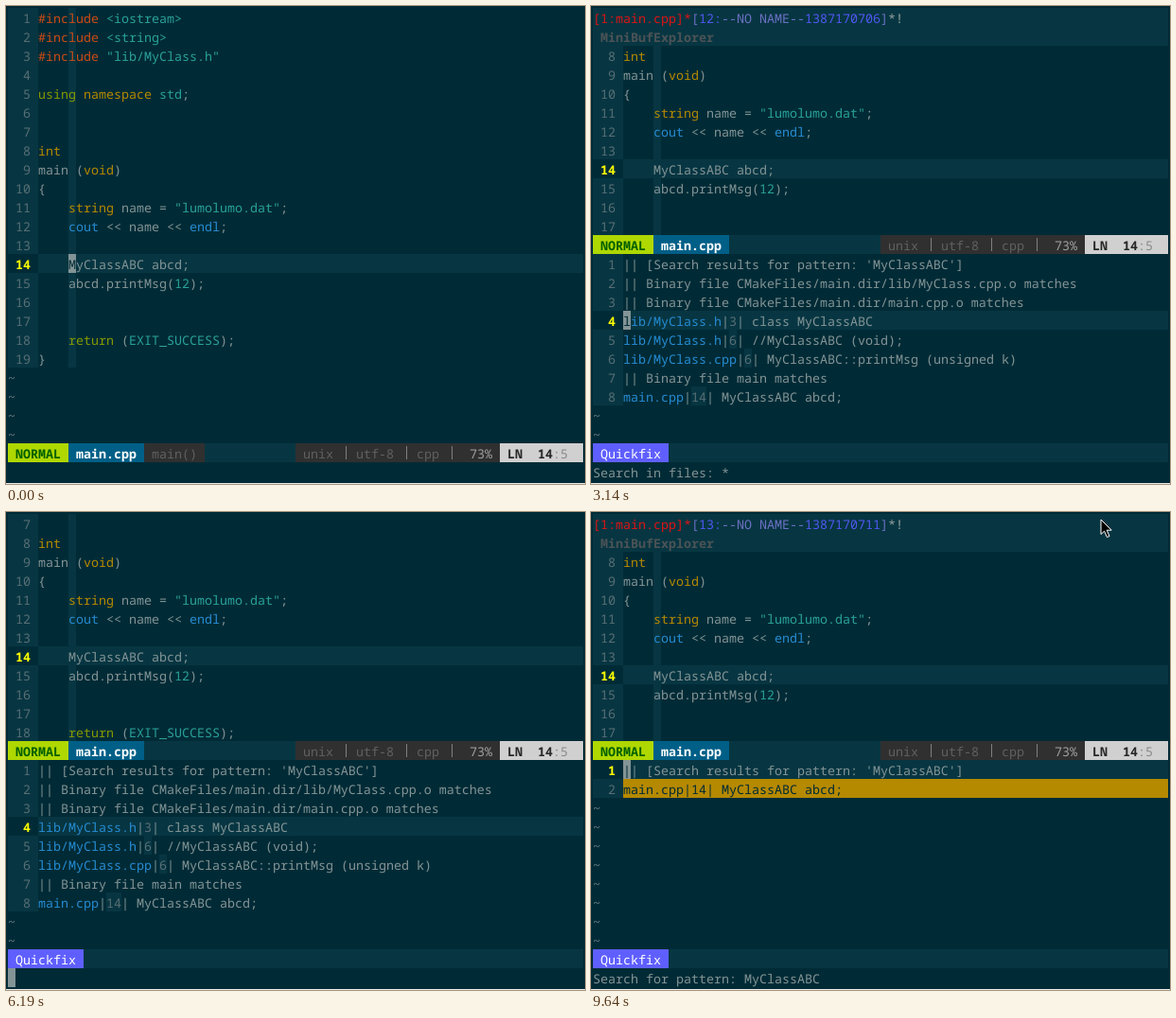
These frames come from a looping animation (612x505 px, 9690 ms). An HTML page:

```html
<!DOCTYPE html>
<html lang="en">
<head>
<meta charset="utf-8">
<title>Searching files from the editor</title>
<style>
  html, body { margin: 0; width: 100%; height: 100%; overflow: hidden; background: #002b36; }
  #stage { position: relative; width: 612px; height: 505px; overflow: hidden; }
  #stage::after { content: ""; position: absolute; left: 0; top: 504px; width: 612px; height: 1px; background: #eee; }
  #term { position: absolute; left: 2px; top: 2px; width: 608px; height: 500px; color: #839496;
    font: 13.3333px/22px "Noto Sans Mono", monospace; text-rendering: geometricPrecision; }
  #term i { position: absolute; height: 20px; font-style: normal; white-space: pre; }
  #mouse { position: absolute; left: 538px; top: 7px; }
  .o { color: #cb4b16 } .c { color: #2aa198 } .g { color: #859900 } .y { color: #b58900 }
  .b { color: #268bd2 } .n { color: #586e75 } .t { color: #657b83 }
  .r { color: #dc1414 } .v { color: #6c71c4 } .d { color: #5058f0 } .w { color: #93a1a1 }
  .cur { color: #ff0; font-weight: bold }
  .band { background: #073642 }
  .k { background: #073642; color: #586e75 }
  .hit { background: #b58900; color: #002b36 }
  .caret { background: #839496; color: #002b36 }
  .mode { background: #afd700; color: #005f00; font-weight: bold }
  .file { background: #005f87; color: #fff; font-weight: bold }
  .info { background: #303030; color: #606060 }
  .pct { background: #303030; color: #9e9e9e }
  .pos { background: #d0d0d0; color: #262626; font-weight: bold }
  .col { color: #8a8a8a }
  .sep { width: 1px; height: 14px !important; margin: 3px 0 0 5px; background: #808080 }
  .mini { background: #073642; color: #4c5356; font-weight: bold }
  .qf { background: #5f5fff; color: #fff }
</style>
</head>
<body>
<div id="stage">
  <div id="term"></div>
  <svg id="mouse" width="14" height="21" viewBox="-1 -1 14 21">
    <path d="M0 0V15.5L3.6 12.2 6.4 18.6 9 17.5 6.2 11.2H11.2Z" fill="#000" stroke="#fff"/>
  </svg>
</div>
<script>
const LOOP = 9690, COLS = 76;

// Backticks wrap a coloured run; its first letter names the class.
const code = [
  '`o#include` `c<iostream>`',
  '`o#include` `c<string>`',
  '`o#include` `c"lib/MyClass.h"`',
  '',
  '`gusing` `ynamespace` `cstd`;',
  '',
  '',
  '`yint`',
  'main (`yvoid`)',
  '{',
  '    `ystring` name = `c"lumolumo.dat"`;',
  '    `bcout` << name << `bendl`;',
  '',
  '    MyClassABC abcd;',
  '    abcd.printMsg(`c12`);',
  '',
  '',
  '    `greturn` (`cEXIT_SUCCESS`);',
  '}'
];
const title = "|| [Search results for pattern: 'MyClassABC']";
const lists = {
  files: {
    hit: 4, buf: ['12', '1387170706'], prompt: 'Search in files: *',
    rows: [
      title,
      '|| Binary file CMakeFiles/main.dir/lib/MyClass.cpp.o matches',
      '|| Binary file CMakeFiles/main.dir/main.cpp.o matches',
      '`blib/MyClass.h`|`k3`| class MyClassABC',
      '`blib/MyClass.h`|`k6`| //MyClassABC (void);',
      '`blib/MyClass.cpp`|`k6`| MyClassABC::printMsg (unsigned k)',
      '|| Binary file main matches',
      '`bmain.cpp`|`k14`| MyClassABC abcd;'
    ]
  },
  buffer: {
    hit: 2, buf: ['13', '1387170711'], prompt: 'Search for pattern: MyClassABC',
    rows: [title, '`bmain.cpp`|`k14`| MyClassABC abcd;']
  }
};

const plain = s => s.replace(/`(?:(\w)([^`]*))`/g, '$2');
const esc = s => s.replace(/&/g, '&amp;').replace(/</g, '&lt;');

function cell(col, row, text, cls = '', width = text.length) {
  return `<i class="${cls}" style="left:${col * 8}px;top:${row * 20}px;` +
    (cls === 'sep' ? '' : `width:${width * 8}px`) + `">${esc(text)}</i>`;
}

function runs(col, row, markup) {
  let html = '';
  markup.split('`').forEach((part, i) => {
    const text = i % 2 ? part.slice(1) : part;
    if (text) html += cell(col, row, text, i % 2 ? part[0] : '');
    col += text.length;
  });
  return html;
}

function numbered(row, n, markup, current) {
  const num = String(n).padStart(3) + ' ';
  return (current ? cell(4, row, '', 'band', COLS - 4) : '') +
    cell(0, row, num, current ? 'cur' : 'k') + runs(4, row, markup);
}

function caret(col, row, markup = '') {
  return cell(col, row, plain(markup)[col - 4] || ' ', 'caret');
}

function codeRows(first, last, top, line) {
  let html = '';
  for (let n = first; n <= last; n++) {
    const row = top + n - first;
    html += cell(8, row, '', 'band', 1) + numbered(row, n, code[n - 1], n === line);
  }
  return html;
}

function tildes(from, to) {
  let html = '';
  for (let row = from; row < to; row++) html += cell(0, row, '~', 't');
  return html;
}

function status(row, line, col, tag) {
  const pct = Math.floor(line * 100 / code.length) + '%';
  return cell(0, row, '', 'band', COLS) +
    cell(0, row, ' NORMAL ', 'mode') +
    cell(8, row, ' main.cpp ', 'file') +
    (tag ? cell(18, row, ' main() ', 'info') : '') +
    cell(38, row, ' unix   utf-8   cpp', 'info', 22) +
    [44, 52, 58].map(c => cell(c, row, '', 'sep')).join('') +
    cell(60, row, pct.padStart(4) + ' ', 'pct') +
    cell(65, row, ' LN ' + String(line).padStart(3), 'pos', 11) +
    cell(72, row, ':' + col, 'col');
}

function editor({ line = 14, col = 5, prompt }) {
  let html = codeRows(1, 19, 0, line) + tildes(19, 23) + status(23, line, col, true);
  if (prompt === undefined) return html + caret(col + 3, line - 1, code[line - 1]);
  return html + cell(0, 24, prompt) + cell(0, 24, prompt[0] || ' ', 'caret');
}

function split({ list, line, closing, bare }) {
  const { hit, buf, prompt, rows } = lists[list];
  let html = bare ? codeRows(7, 18, 0, 14) :
    cell(0, 0, '', 'band', COLS) +
    runs(0, 0, '`r[1:main.cpp]*``v[``d' + buf[0] + ':``v--NO NAME--``d' + buf[1] + '``v]``w*!`') +
    cell(0, 1, ' MiniBufExplorer', 'mini', COLS) + codeRows(8, 17, 2, 14);
  html += status(12, 14, 5, false);
  rows.forEach((markup, i) => {
    const n = i + 1, row = 13 + i, current = n === line;
    html += numbered(row, n, markup, current);
    if (n === hit && !current) html += cell(4, row, plain(markup), 'hit', COLS - 4);
    if (current && !closing) html += caret(4, row, markup);
  });
  return html + tildes(13 + rows.length, 23) +
    cell(0, 23, '', 'band', COLS) + cell(0, 23, ' Quickfix ', 'qf') +
    (closing ? caret(0, 24) : cell(0, 24, prompt));
}

const inFiles = (line, more) => split({ list: 'files', line, ...more });
const inBuffer = line => split({ list: 'buffer', line });
const steps = [
  [0, editor({})],
  [680, editor({ line: 15 })],
  [820, editor({ line: 1, col: 1 })],
  [1060, editor({ line: 15 })],
  [1230, editor({})],
  [2220, editor({ prompt: lists.files.prompt })],
  [3140, inFiles(4)],
  [3690, inFiles(5)],
  [4130, inFiles(6)],
  [4570, inFiles(7)],
  [4830, inFiles(8)],
  [5110, inFiles(7)],
  [5340, inFiles(6)],
  [5450, inFiles(5)],
  [5630, inFiles(4)],
  [6140, inFiles(4, { closing: true })],
  [6190, inFiles(4, { closing: true, bare: true })],
  [6240, editor({})],
  [7520, editor({ prompt: '' })],
  [7570, editor({ prompt: lists.buffer.prompt })],
  [7860, inBuffer(2)],
  [8720, inBuffer(1)]
];

const term = document.getElementById('term');
const mouse = document.getElementById('mouse');
let shown = -1;

function draw(now) {
  const t = now % LOOP;
  let i = steps.length - 1;
  while (steps[i][0] > t) i--;
  if (i !== shown) term.innerHTML = steps[shown = i][1];
  mouse.style.visibility = t >= 9640 ? 'visible' : 'hidden';
}

const start = performance.now();
function tick() {
  draw(performance.now() - start);
  requestAnimationFrame(tick);
}
tick();
</script>
</body>
</html>
```
